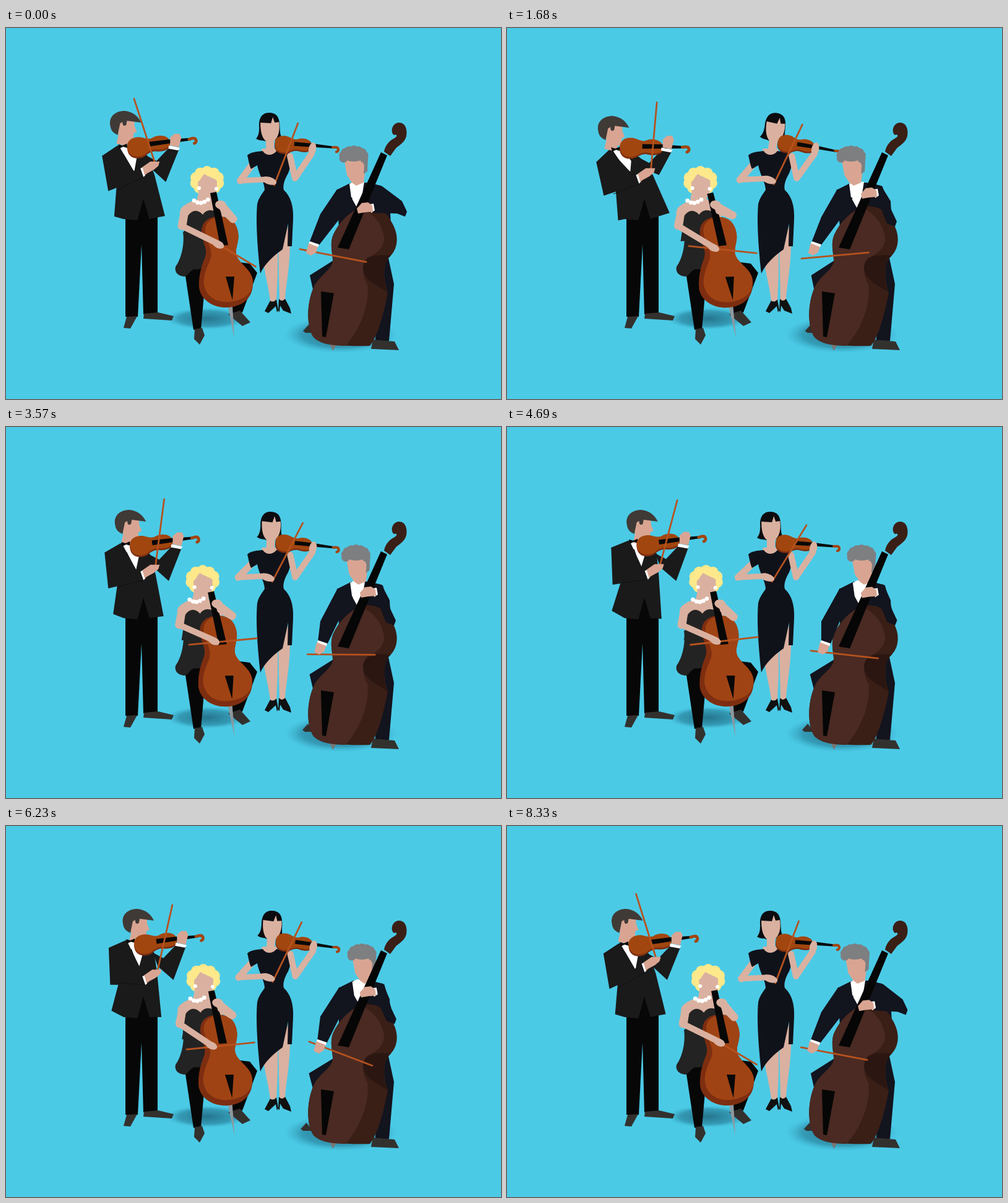
These frames come from a looping animation (800 by 600 pixels, 8400 ms). An HTML page with a canvas:

```html
<!DOCTYPE html>
<html lang="en">
<head>
<meta charset="utf-8">
<title>String quartet</title>
<style>
html, body { margin: 0; width: 100%; height: 100%; overflow: hidden; background: #4bcae6; }
canvas { display: block; }
</style>
</head>
<body>
<canvas id="stage" width="800" height="600"></canvas>
<script>
const g = document.getElementById('stage').getContext('2d');
const LOOP = 8400, STEP = 70, TAU = Math.PI * 2;
const C = {
  sky: '#4bcae6', suit: '#1a1a1a', legs: '#070707', shoe: '#33312e', white: '#fff',
  skin: '#d9a592', pale: '#dab1a0', bow: '#b5521f', wood: '#a2460f', edge: '#7e2e10',
  gown: '#10121a', navy: '#12141e', bass: '#4a2a22', side: '#3a1f16', dark: '#2b1611'
};
const { cos, sin, min } = Math;

// Periodic sway: a mean plus the first harmonics of the loop.
function wave(a, mean, c1 = 0, s1 = 0, c2 = 0, s2 = 0, c3 = 0, s3 = 0) {
  return mean + c1 * cos(a) + s1 * sin(a) + c2 * cos(2 * a) + s2 * sin(2 * a)
    + c3 * cos(3 * a) + s3 * sin(3 * a);
}
// Short pulse around one moment of the loop (0 to 1).
function pulse(a, at) {
  const d = Math.abs(((a / TAU - at + 1.5) % 1) - .5);
  return Math.exp(-((d / .05) ** 2));
}

const cache = {};
function shape(color, d) {
  g.fillStyle = color;
  g.fill(cache[d] || (cache[d] = new Path2D(d)));
}
function trace(p) {
  g.beginPath();
  for (let i = 0; i < p.length; i += 2) g.lineTo(p[i], p[i + 1]);
}
function poly(color, ...p) {
  trace(p);
  g.closePath();
  g.fillStyle = color;
  g.fill();
}
function line(color, width, ...p) {
  trace(p);
  g.strokeStyle = color;
  g.lineWidth = width;
  g.lineCap = g.lineJoin = 'round';
  g.stroke();
}
function oval(color, x, y, rx, ry = rx, deg = 0) {
  g.beginPath();
  g.ellipse(x, y, rx, ry, deg * TAU / 360, 0, TAU);
  g.fillStyle = color;
  g.fill();
}
function moved(x, y, draw) {
  g.save();
  g.translate(x, y);
  draw();
  g.restore();
}
function turned(x, y, deg, draw) {
  moved(x, y, () => {
    g.rotate(deg * TAU / 360);
    g.translate(-x, -y);
    draw();
  });
}
function curls(color, x, y, rx, ry, r, from, to) {
  for (let i = 0; i <= 8; i++) {
    const b = (from + (to - from) * i / 8) * TAU / 360;
    oval(color, x + rx * cos(b), y + ry * sin(b), r);
  }
}
function bow(x, y, deg, back, front) {
  const b = deg * TAU / 360, dx = cos(b), dy = sin(b);
  line(C.bow, 2.8, x - back * dx, y - back * dy, x + front * dx, y + front * dy);
}
function shadow(x, y, rx, ry) {
  moved(x, y, () => {
    g.scale(rx, ry);
    const s = g.createRadialGradient(0, 0, .1, 0, 0, 1);
    s.addColorStop(0, 'rgba(18,72,95,.62)');
    s.addColorStop(.65, 'rgba(20,85,110,.4)');
    s.addColorStop(1, 'rgba(40,150,180,0)');
    oval(s, 0, 0, 1);
  });
}

function violin(x, y, deg, size, reach) {
  const body = 'M-36 0C-37-14-22-19-10-15C-2-12 2-10 8-12C18-17 36-14 37-2C38 8 26 11 14 9C6 7 2 9-4 12C-16 21-36 17-36 0Z';
  moved(x, y, () => {
    g.rotate(deg * TAU / 360);
    g.scale(size, size);
    moved(-.5, 3, () => shape(C.edge, body));
    shape(C.wood, body);
    poly('#080808', 2, -6, 36, -6, 68 + reach, -4, 68 + reach, 0, 36, 1, 2, 2);
    moved(reach, 0, () => {
      g.strokeStyle = C.wood;
      g.lineWidth = 5;
      g.lineCap = 'round';
      g.stroke(new Path2D('M66-2L72-3C79-3 79 5 74 6'));
    });
  });
}

function drawMan(a) {
  const hx = wave(a, 5.5, -10, -20, 5);
  const back = min(0, hx), hy = -.4 * back;
  const tilt = wave(a, 4, -14, -3, -8, 0, 0, -3);
  const wx = 218 + .5 * hx + wave(a, 0, 3, 4);
  const wy = wave(a, 239, 0, 0, -6) + 6 * sin(15 * a);
  const ex = wx - 56, ey = 264 - .35 * hx;
  const vx = .54 * hx + back * .1, vy = -.06 * hx - back * .1;
  const cx = .62 * hx, cy = -.24 * hx;
  const sx = 155 + .52 * hx, sy = 207 - .47 * hx;

  shape(C.legs, 'M193 305L245 305L245 462L222 463L219 350L213 467L193 467Z');
  shape(C.shoe, 'M195 467L212 466L201 486L190 485Z');
  shape(C.shoe, 'M223 462L246 460L271 466L268 473L222 470Z');

  poly(C.suit, 226 + vx, 206 + vy, 243 + vx, 215 + vy, 262 + vx, 195 + vy, 279 + vx, 197 + vy,
    258 + .6 * hx, 249 + .55 * back, 234 + vx, 227);
  poly(C.suit, sx, sy, 180 + cx, 190 + cy, 200 + cx, 193 + cy, 228 + vx, 206 + vy, 240 + .2 * hx, 238,
    257 - .28 * hx, 304 + .24 * hx, 231, 309, 222, 303, 213, 311, 190, 309,
    175 - .22 * hx, 305 - .3 * hx, 179 + .2 * hx, 250);
  poly(C.legs, 212, 312, 222, 276, 232, 310);
  poly(C.white, 183 + cx, 192 + cy, 198 + cx, 189 + cy, 211 + cx * .8, 210 + cy, 207 + .4 * hx, 233 - .3 * hx);
  moved(hx, hy, () => {
    shape(C.skin, 'M180 152L181 174L178 187L190 190L199 186L199 182L205 181L206 170L211 168L207 158L207 149Z');
    shape('#403a36', 'M168 158C165 142 178 134 191 134C205 135 214 144 218 153L195 150L194 156C192 160 187 158 188 152L184 154L180 173C173 170 169 166 168 158Z');
  });
  moved(cx, cy, () => shape('#0a0a0a', 'M181 188L188 190L195 187L196 194L189 192L183 195Z'));

  violin(230 + vx, 190 + vy, -7 - back * .4, .95, 4);
  moved(vx, vy, () => {
    shape(C.skin, 'M265 177L272 171L280 171L283 177L279 193L265 190Z');
    shape(C.white, 'M263 190L281 194L278 198L262 195Z');
  });
  bow(wx + 20, wy - 13, tilt - 90, 0, 111);
  poly(C.suit, sx, sy, 190 + cx, 204 + cy, 206 + .4 * hx, 231, wx - 3, wy - 6, wx + 1, wy + 8, ex, ey);
  line('#101010', 1, wx + 1, wy + 8, ex + 16, ey - 3);
  moved(wx, wy, () => {
    shape(C.white, 'M-4-6L0-8L4 5L1 8Z');
    shape(C.skin, 'M-1-8L12-17L27-17L25-10L18-4L7 2L3 5Z');
  });
}

function drawLady(a) {
  const turn = wave(a, 3.7, 0, 2.5, -3.5);
  const tilt = wave(a, 25.5, -4.5, 0, 0, 2.5);
  const vx = turn * .35, hx = 432 - .5 * (tilt - 24), hy = wave(a, 252, 2);
  const ex = hx - 55, ey = hy - 7;

  shape(C.pale, 'M415 370L439 358L439 400L437 442L427 442C425 420 418 400 415 370Z');
  shape(C.pale, 'M440 355L454 312L459 352C458 395 452 415 451 441L442 441Z');
  shape('#111', 'M427 441Q432 445 437 439L440 456L438 460L436 450L424 461L418 458Z');
  shape('#111', 'M441 438Q446 444 451 438L459 453L461 462L448 457L443 449L442 459L440 458Z');

  line(C.pale, 11, 400, 218, ex, ey);
  shape(C.pale, 'M414 195L437 195L444 212L410 212Z');
  shape(C.gown, 'M390 206C396 200 406 200 415 199C420 207 431 207 437 199L458 201C464 212 460 225 456 235C450 245 447 255 449 262C460 272 465 288 464 310L462 353L455 353L456 316L447 358C430 370 418 382 411 397C408 370 403 320 406 285C408 275 414 268 418 262C418 250 409 238 406 222L396 228C393 222 392 213 390 206Z');
  moved(vx, 0, () => turned(426, 188, turn, () => {
    shape('#0c0c10', 'M425 137C412 137 408 148 409 160C409 170 408 174 404 179C410 183 415 181 419 183L434 182C438 180 443 182 447 178C442 174 443 166 442 155C441 143 436 137 425 137Z');
    shape(C.pale, 'M411 153L428 154L431 144L434 153L441 152C443 166 440 177 433 183L433 200L420 200L420 183C413 177 411 166 411 153Z');
  }));
  line(C.pale, 10, 459 + vx * .4, 207, 467 + vx * .4, 243, 494 + vx, 203);
  violin(464 + vx, 189, 5 + turn * .6, .82, 12);
  oval(C.pale, 495 + vx, 196, 6, 11, 12);
  bow(hx, hy, tilt - 90, 0, 107);
  line(C.pale, 9, ex, ey, hx - 15, hy - 9);
  oval(C.pale, hx - 8, hy - 7, 12, 6, 18);
}

function drawCellist(a) {
  const hx = wave(a, -6, 2, -4, 4), k = hx * .6;
  const px = wave(a, 340, 3, 0, 4), py = wave(a, 353, 3, 0, -4);
  const ex = 284 + k, ey = 320, fx = 345 + .8 * hx, fy = 286;

  shape(C.legs, 'M288 388L325 374L315 488L303 488Z');
  shape(C.shoe, 'M305 487L317 485L321 497L313 512L304 503Z');
  shape(C.legs, 'M370 378L394 381L406 396L382 460L364 462Z');
  shape(C.shoe, 'M359 463L378 457L395 476L382 482Z');

  moved(k, 0, () => shape(C.pale, 'M281 300C281 288 292 284 308 277L328 274C336 284 354 286 358 292L350 315L290 318Z'));
  shape('#232323', 'M292 325L345 320L330 376C322 386 316 392 306 390C298 390 294 402 288 402C277 401 272 394 274 386C283 374 289 350 286 330Z');
  moved(k, 0, () => shape('#232323', 'M294 304C302 292 312 295 318 302C322 294 334 292 341 299L346 340L288 345Z'));
  moved(hx, 0, () => {
    curls('#fde98b', 325, 247, 19, 15, 9, 130, 410);
    shape(C.pale, 'M310 249C315 246 317 238 321 236C328 242 336 242 341 247L341 262C339 271 335 274 331 282L308 281L311 266Z');
    oval(C.white, 312, 259, 3);
    oval(C.white, 340, 260, 3);
    for (let i = 0; i < 5; i++) oval(C.white, 304 + i * 5.6, 278 + 5 * sin((i + .3) * .75), 3.4);
  });

  turned(366, 470, hx * .15, () => {
    shape('#8d989e', 'M359 451L366 449L369 501Z');
    shape(C.edge, 'M343 305C325 305 313 317 317 335C319 350 326 358 322 370C316 385 311 400 312 420C315 440 335 453 358 452C385 450 400 435 399 410C398 390 376 382 372 366C370 355 378 345 375 330C372 312 360 304 343 305Z');
    shape('#a04314', 'M343 306C328 308 319 318 323 335C327 350 334 361 331 372C326 385 318 400 320 415C324 435 340 444 360 443C388 440 399 428 399 410C398 390 376 382 372 366C370 355 378 345 375 330C372 312 360 304 343 306Z');
    shape('#080808', 'M330 267L340 265L359 351L346 352Z');
    shape('#080808', 'M355 402L369 402L366 440Z');
  });
  line(C.pale, 13, fx + 8, fy + 9, 367 + hx * .2, 309 + hx * .5, fx + 5, fy + 3);
  oval(C.pale, fx + 2, fy, 9, 7, 10);
  bow(px, py, wave(a, 5, 18, 2, 8), 44, 66);
  line(C.pale, 13, 289 + k, 295, ex, ey);
  line(C.pale, 10, ex, ey, px - 8, py - 5);
  oval(C.pale, px - 4, py - 2, 10, 6, 25);
}

function drawBassist(a) {
  const hx = wave(a, 4, -4, -9), k = hx * .25, foot = -hx * .28;
  const wx = wave(a, 504, -8, -4), wy = 352;
  const ex = 509, ey = wave(a, 308, -7);
  // The fingering arm reaches down the neck twice per loop.
  const reach = pulse(a, 0) + pulse(a, .655);
  const kx = 630 + 18 * reach, ky = 318 - 16 * reach;
  const fx = 584 - 5 * reach, fy = 267 + 24 * reach;

  moved(foot, 0, () => shape(C.shoe, 'M480 490L489 480L500 493L484 493Z'));
  poly(C.navy, 491 + foot * .4, 400, 532, 374, 532, 430, 499, 436);
  shape(C.navy, 'M600 380L618 372L627 414L619 506L597 506Z');
  shape(C.shoe, 'M593 504L628 507L635 521L590 519Z');

  poly(C.navy, 534 + k, 262, 558 + k, 250, 582 + k, 250, 606 + k, 255, 620, 280, 622, 318, 590, 340, 538, 322);
  moved(hx * .35, 0, () => shape(C.white, 'M555 252L562 248L579 249L575 274L568 292L558 274Z'));
  moved(hx, 0, () => {
    shape(C.skin, 'M546 210L583 208L580 236L578 250L566 255L559 250L551 238Z');
    shape('#7d7f81', 'M574 212L585 210L584 232L578 236L579 222Z');
    oval('#7d7f81', 562, 206, 18, 10);
    curls('#7d7f81', 562, 208, 17, 11, 7, 165, 375);
  });

  shape('#777', 'M522 508L536 510L528 522Z');
  shape(C.side, 'M572 290C594 284 614 294 622 312C635 332 635 354 622 368C610 378 608 400 617 428C610 465 600 500 588 514C560 515 515 514 497 500C485 482 486 445 497 420C505 401 526 392 528 378C529 368 522 350 529 334C538 314 555 298 572 290Z');
  shape(C.bass, 'M572 290C592 298 607 314 611 338C613 352 600 366 584 371C574 380 576 402 584 415C588 440 578 480 549 514C522 514 505 509 497 500C485 482 486 445 497 420C505 401 526 392 528 378C529 368 522 350 529 334C538 314 555 298 572 290Z');
  shape(C.dark, 'M622 368C602 366 580 366 577 386C577 408 600 416 616 427C608 405 608 380 622 368Z');
  shape('#060606', 'M509 426L530 429L517 500L511 499Z');
  poly(C.navy, 594 + k, 252, 608 + k, 256, kx - 8, ky - 22, kx, ky - 5, kx - 3, ky + 3, kx - 16, ky - 2,
    fx + 14, fy + 8, fx + 17, fy - 4);
  shape('#060606', 'M606 201L616 206L554 358L536 355Z');
  shape(C.side, 'M611 200C613 189 620 182 628 178C633 175 632 171 627 173C621 169 623 154 635 153C646 153 649 165 647 175C644 187 633 190 629 196L621 207Z');

  moved(fx, fy, () => {
    shape(C.white, 'M9-6L15-7L17 4L11 8Z');
    shape(C.skin, 'M-12 1L-4-8L6-9L13-4L14 6L2 7L-10 9Z');
  });
  bow(wx + 32, wy + 16, wave(a, 7, -5, -6, -5, 4, 14), 54, 55);
  poly(C.navy, 535 + k, 261, 560 + k, 275, 541, 306, wx + 10, wy - 1, wx - 5, wy - 7, ex - 1, ey);
  moved(wx, wy, () => {
    shape(C.white, 'M-5-7L10-2L8 3L-7-3Z');
    shape(C.skin, 'M-7-4L8 2L5 11L-3 16L-11 12Z');
  });
}

function draw(t) {
  const a = TAU * t / LOOP;
  g.fillStyle = C.sky;
  g.fillRect(0, 0, 800, 600);
  shadow(324, 470, 66, 18);
  shadow(541, 496, 92, 30);
  drawMan(a);
  drawLady(a);
  drawCellist(a);
  drawBassist(a);
}

const start = performance.now();
function tick() {
  const t = (performance.now() - start) % LOOP;
  draw(Math.floor(t / STEP) * STEP);
  requestAnimationFrame(tick);
}
tick();
</script>
</body>
</html>
```
